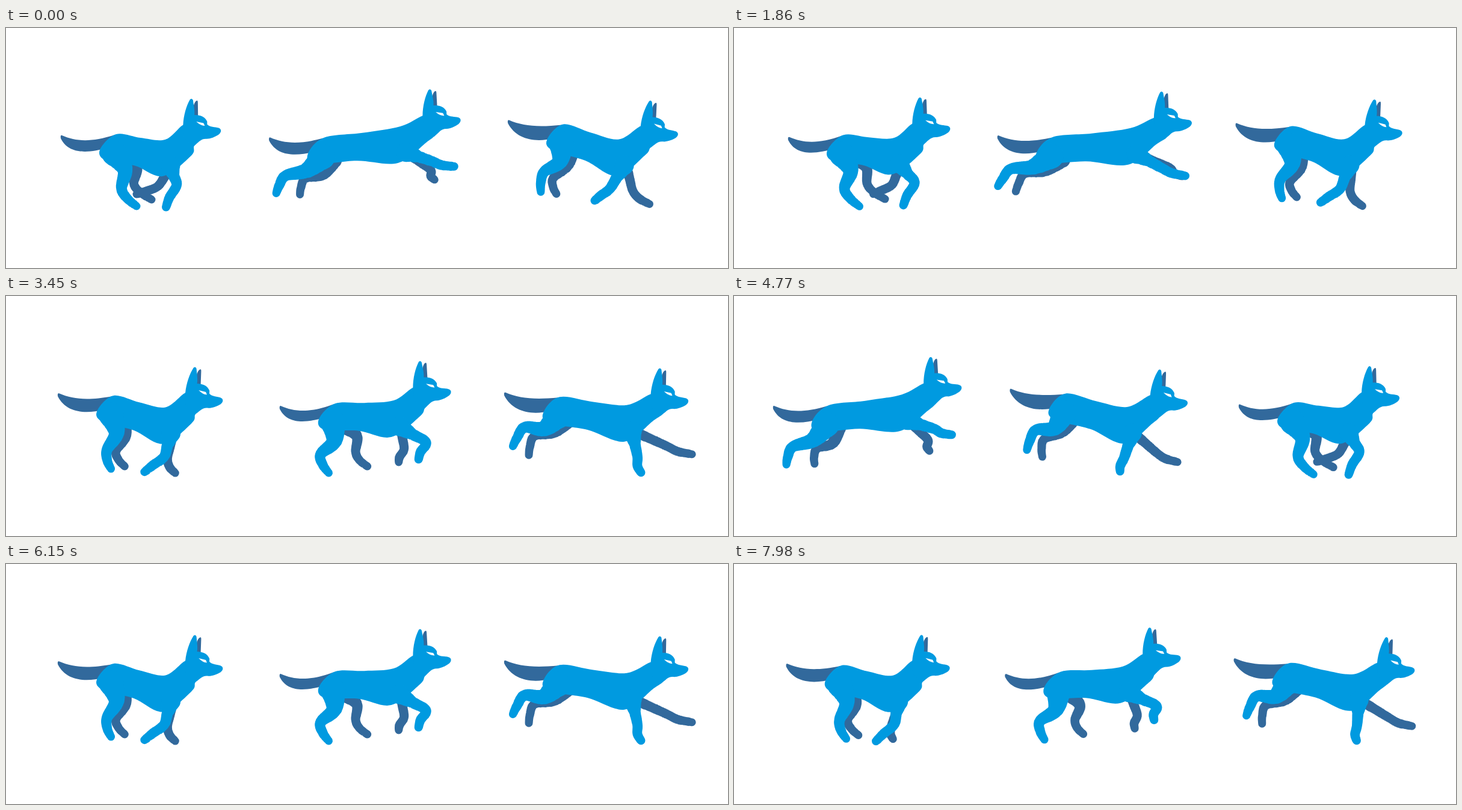
Animation, 1200 px wide and 400 px high, one loop 8 s. Source, as an HTML page:

```html
<!DOCTYPE html>
<html lang="en">
<head>
<meta charset="utf-8">
<title>Running dogs</title>
<style>
  html, body { margin: 0; width: 100%; height: 100%; overflow: hidden; background: #fff; }
  svg { display: block; width: 100%; height: 100%; }
</style>
</head>
<body>
<svg id="stage" viewBox="0 0 1200 400" xmlns="http://www.w3.org/2000/svg"></svg>
<script>
const NEAR = '#009ae0', FAR = '#32699c';
const LOOP = 8000, STEP = 30, CYCLE = 30;

// Harmonic swing: mean + c1 cos a + s1 sin a + c2 cos 2a + s2 sin 2a + c3 cos 3a
const wave = (mean, c1, s1, c2 = 0, s2 = 0, c3 = 0) => a =>
  mean + c1 * Math.cos(a) + s1 * Math.sin(a) +
  c2 * Math.cos(2 * a) + s2 * Math.sin(2 * a) + c3 * Math.cos(3 * a);

// A point whose x and y each follow a wave
const mover = (x, y) => a => [x(a), y(a)];

const rump = mover(wave(145, 9, -8, 2, 5), wave(199.5, 1, 10, 2.5, -2.5));
const withers = mover(wave(274, -11, 3, 1.5), wave(178.5, 5, -9.5, 2.5, 3));
const noseReach = mover(wave(98, -5, 0), wave(-11.5, -4, -2));
const headTilt = wave(-0.5, -0.3, -3.2);
const tailReach = mover(wave(-65, 0, 0), wave(-27, 4, 4.5));

// Hind legs hang from the rump, fore legs from the withers; knees bend by `bend`
const legs = {
  farHind: {
    root: rump, offset: [43, 12], bend: 0.4, girth: [13, 9, 7.5, 7, 6.5],
    joint: mover(wave(165.5, 51, 0, 0, 14, -4), wave(250.5, 13, 3, -4, -2)),
    toe: mover(wave(172, 73, -1, 1, 18, -4), wave(278, 10, 2, -2, -2))
  },
  farFore: {
    root: withers, offset: [12, 44], bend: 0, girth: [9, 8, 7.5, 7.5, 6.5],
    joint: mover(wave(303, -52, 10, 4, 1, -3), wave(255.5, 12, -13, -3.5, 4)),
    toe: mover(wave(311, -83, -3.5, -1, 2, -10), wave(273, 14, -14, -8, 3.5, -2))
  },
  nearHind: {
    root: rump, offset: [24, 6], bend: 0.5, girth: [21, 12.5, 9, 8, 6.5],
    joint: mover(wave(139, 46, -18, 7, 7), wave(247, 23, 7.5, -3, -3)),
    toe: mover(wave(138, 70, -17, 9, 10), wave(278, 23, 6, -4, -2))
  },
  nearFore: {
    root: withers, offset: [9, 43], bend: 0, girth: [16, 9.5, 8.5, 8, 7],
    joint: mover(wave(299, -16, 38, 5.5, -2.5, -5), wave(254, 4.5, -20.5, 6.5, 6.5, -3)),
    toe: mover(wave(296, -40, 58, 10, -11), wave(278, 12.5, -23, 13, 11, -5))
  }
};
const THIGH = 38;

// Head parts, measured from the tip of the nose
const HEAD = 'M-63-10C-62-26-57-42-51-52Q-48-55-46-51C-45-42-43-34-44-26' +
  'C-36-26-27-24-23-15L-23-10C-18-5-10-6-4-4C1-2 1 3-4 7C-10 11-18 14-24 14' +
  'C-34 13-38 20-46 26L-62 12Z';
const FAR_EAR = 'M-45-42C-43-48-41-50-39-50Q-38-50-38-47L-38-24L-46-22Z';
const EYE = 'M-41-15L-29-12.5L-27-8Q-34-8-41-15Z';

const num = v => v.toFixed(2);
const plus = ([x, y], dx, dy) => [x + dx, y + dy];
const middle = (p, q) => [(p[0] + q[0]) / 2, (p[1] + q[1]) / 2];

// Cubic controls between b and c on a smooth curve through a, b, c, e
const controls = (a, b, c, e) => [
  b.map((v, k) => v + (c[k] - a[k]) / 6),
  c.map((v, k) => v - (e[k] - b[k]) / 6)
];

function outline(points) {
  const n = points.length;
  const at = i => points[(i + n) % n];
  let d = 'M' + points[0].map(num);
  points.forEach((b, i) => {
    const [out, into] = controls(at(i - 1), b, at(i + 1), at(i + 2));
    d += `C${out.map(num)} ${into.map(num)} ${at(i + 1).map(num)}`;
  });
  return d + 'Z';
}

const disc = (x, y, r) => `M${num(x - r)},${num(y)}` +
  [1, -1].map(s => `a${num(r)},${num(r)} 0 1 0 ${num(2 * r * s)},0`).join('');

// Tapered limb swept along a smooth curve
function sweep(points, radii) {
  const last = points.length - 1, parts = 14;
  const at = i => points[Math.max(0, Math.min(last, i))];
  let d = '';
  for (let i = 0; i < last; i++) {
    const b = at(i), c = at(i + 1);
    const [out, into] = controls(at(i - 1), b, c, at(i + 2));
    for (let j = 0; j <= parts; j++) {
      const u = j / parts, v = 1 - u;
      const [x, y] = [0, 1].map(k => v * v * v * b[k] +
        3 * u * v * (v * out[k] + u * into[k]) + u * u * u * c[k]);
      d += disc(x, y, radii[i] * v + radii[i + 1] * u);
    }
  }
  return d;
}

function legPath({ root, offset, bend, girth, joint, toe }, a) {
  const top = plus(root(a), ...offset), low = joint(a), foot = toe(a);
  const dx = low[0] - top[0], dy = low[1] - top[1], span = Math.hypot(dx, dy);
  const bow = bend * Math.sqrt(Math.max(0, THIGH ** 2 - span ** 2 / 4)) / span;
  const knee = plus(middle(top, low), dy * bow, -dx * bow);
  const ankle = plus(middle(low, foot), -3, 2);
  return sweep([top, knee, low, ankle, foot], girth);
}

function tailPath([x, y], [bx, by]) {
  return `M${x + 2},${y - 1}C${x + 25},${y + 9} ${x + 50},${y + 11} ${bx - 2},${by + 1}` +
    `L${bx - 15},${by + 23}C${bx - 45},${by + 31} ${x + 14},${y + 32} ${x},${y + 4}` +
    `Q${x - 1},${y - 2} ${x + 2},${y - 1}Z`;
}

const stage = document.getElementById('stage');

function add(parent, tag, attrs) {
  const el = document.createElementNS('http://www.w3.org/2000/svg', tag);
  for (const name in attrs) el.setAttribute(name, attrs[name]);
  return parent.appendChild(el);
}

function makeDog(x, lead) {
  const group = add(stage, 'g', { transform: `translate(${x})` });
  const shape = (fill, d = '') => add(group, 'path', { fill, d });
  return {
    lead,
    tail: shape(FAR), farHind: shape(FAR), farFore: shape(FAR), ear: shape(FAR, FAR_EAR),
    body: shape(NEAR), nearHind: shape(NEAR), nearFore: shape(NEAR),
    head: shape(NEAR, HEAD), eye: shape('#fff', EYE)
  };
}

const dogs = [makeDog(0, 0), makeDog(374, 10), makeDog(748, 22)];

function drawDog(dog, step) {
  const a = (step + dog.lead) / CYCLE * 2 * Math.PI;
  const hips = rump(a), chest = withers(a), croup = plus(hips, 27, -26);
  const nose = plus(chest, ...noseReach(a));
  const tilt = headTilt(a), turn = tilt * Math.PI / 180;
  const onHead = (x, y) => plus(nose,
    x * Math.cos(turn) - y * Math.sin(turn),
    x * Math.sin(turn) + y * Math.cos(turn));

  for (const name in legs) dog[name].setAttribute('d', legPath(legs[name], a));
  dog.tail.setAttribute('d', tailPath(plus(hips, ...tailReach(a)), croup));
  dog.body.setAttribute('d', outline([
    hips, croup, plus(middle(croup, chest), 0, 1.5), chest,
    onHead(-63, -10), onHead(-46, -10), onHead(-34, 12), onHead(-45, 25),
    plus(chest, 43, 27), plus(chest, -4, 61),
    plus(middle(hips, chest), 4, 35), plus(hips, 10, 18)
  ]));
  for (const part of [dog.ear, dog.head, dog.eye]) {
    part.setAttribute('transform', `translate(${nose.map(num)}) rotate(${num(tilt)})`);
  }
}

let shown = -1;
function render(now) {
  const step = Math.floor((now % LOOP) / STEP);
  if (step !== shown) {
    shown = step;
    dogs.forEach(dog => drawDog(dog, step));
  }
}

const start = performance.now();
function tick() {
  render(performance.now() - start);
  requestAnimationFrame(tick);
}
tick();
</script>
</body>
</html>
```
